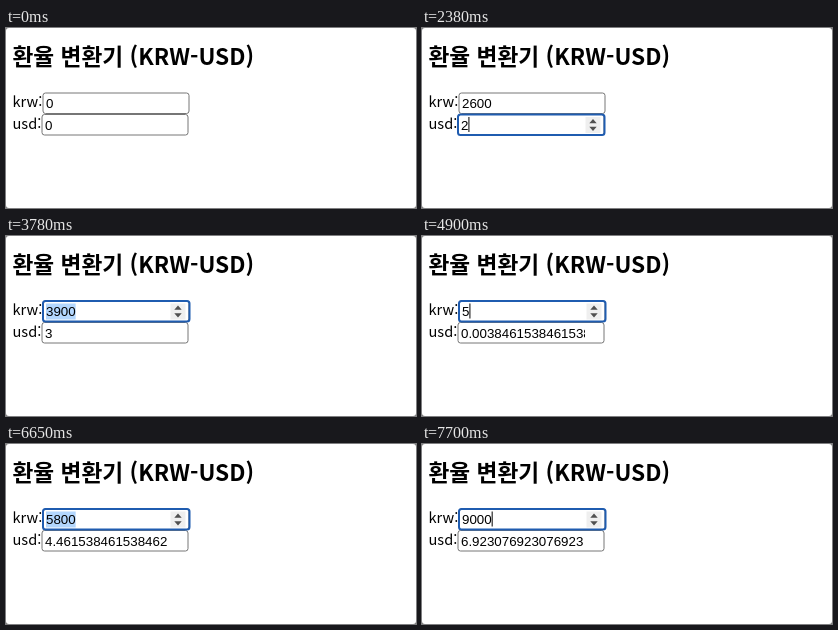
These frames come from a looping animation (410 by 180 pixels, 8 s). An HTML page:

```html
<!DOCTYPE html>
<html lang="ko">
<head>
<meta charset="utf-8">
<title>환율 변환기</title>
<style>
  html, body { margin: 0; width: 100%; height: 100%; overflow: hidden; background: #777; }
  svg { display: block; width: 410px; height: 180px; }
  .label { font-family: "Noto Sans CJK KR", "Noto Sans CJK", "Noto Sans", sans-serif; font-size: 14.6px; }
  .title { font-size: 22.7px; font-weight: 700; }
  .value { font-family: "Liberation Sans", Arial, sans-serif; font-size: 13.333px; }
</style>
</head>
<body>
<svg id="stage" viewBox="0 0 410 180">
  <rect width="410" height="180" rx="3" fill="#fff"/>
  <text class="label title" x="6.5" y="36.5">환율 변환기 (KRW-USD)</text>
  <text class="label" x="6.5" y="79">krw:</text>
  <text class="label" x="6.5" y="100.5">usd:</text>
</svg>
<script>
const LOOP = 8000, RATE = 1300, DIGIT = 7.415;
const stage = document.getElementById('stage');

function add(tag, attrs, parent = stage) {
  const el = document.createElementNS('http://www.w3.org/2000/svg', tag);
  for (const key in attrs) el.setAttribute(key, attrs[key]);
  parent.append(el);
  return el;
}

const show = (el, on) => el.setAttribute('visibility', on ? 'visible' : 'hidden');

function makeField(id, x, y) {
  const g = add('g', { transform: `translate(${x} ${y})` });
  const border = add('rect', { x: .5, y: .5, width: 146, height: 20.5, rx: 2.5, fill: '#fff' }, g);
  const mark = add('rect', { x: 3.5, y: 3, height: 16, fill: '#b3d7fe' }, g);
  const clip = add('clipPath', { id }, g);
  add('rect', { x: 3, y: 2, width: 124.5, height: 18 }, clip);
  const text = add('text', { class: 'value', x: 3.5, y: 15.5, 'clip-path': `url(#${id})` }, g);
  const caret = add('rect', { y: 3, width: 1, height: 15, fill: '#000' }, g);
  const spin = add('g', {}, g);
  add('rect', { x: 128, y: 3, width: 15, height: 16, fill: '#efefef' }, spin);
  add('path', { d: 'M131.8 9.3h7.4l-3.7-4.3zM131.8 12.7h7.4l-3.7 4.3z', fill: '#505050' }, spin);
  const ring = add('rect', { x: .5, y: .5, width: 146.5, height: 20.5, rx: 2.5,
    fill: 'none', stroke: '#1f5cb0', 'stroke-width': 2 }, g);

  return (value, focus, hover, cursor) => {
    const width = value.length * DIGIT;
    text.textContent = value;
    border.setAttribute('stroke', hover ? '#505050' : '#767676');
    mark.setAttribute('width', width);
    caret.setAttribute('x', 3.5 + width);
    show(mark, focus && cursor === 'all');
    show(caret, focus && cursor === 'on');
    show(spin, focus || hover);
    show(ring, focus);
    if (focus) stage.append(g);
  };
}

const draw = {
  krw: makeField('clipKrw', 36.5, 64.5),
  usd: makeField('clipUsd', 35.5, 86)
};

// time, focused field, typed value, cursor, hovered field
const steps = [
  [0, '', 0, 'off', ''],
  [490, 'krw', 0, 'on', 'krw'],
  [630, 'krw', 0, 'on', 'usd'],
  [770, 'usd', 0, 'on', 'usd'],
  [980, 'usd', 0, 'all', 'usd'],
  [1400, 'usd', 1, 'on', ''],
  [1890, 'usd', 1, 'off', ''],
  [2100, 'usd', 1, 'all', ''],
  [2380, 'usd', 2, 'on', ''],
  [2870, 'usd', 2, 'all', ''],
  [3220, 'usd', 3, 'on', ''],
  [3360, 'usd', 3, 'on', 'krw'],
  [3710, 'krw', 3900, 'on', 'krw'],
  [3780, 'krw', 3900, 'all', 'krw'],
  [4900, 'krw', 5, 'on', ''],
  [5390, 'krw', 58, 'on', ''],
  [5600, 'krw', 580, 'on', ''],
  [5810, 'krw', 5800, 'on', ''],
  [6370, 'krw', 5800, 'off', ''],
  [6580, 'krw', 5800, 'on', 'krw'],
  [6650, 'krw', 5800, 'all', 'krw'],
  [7070, 'krw', 9, 'on', ''],
  [7350, 'krw', 90, 'on', ''],
  [7560, 'krw', 900, 'on', ''],
  [7700, 'krw', 9000, 'on', '']
];

let current;
function frame() {
  const t = performance.now() % LOOP;
  const step = steps.findLast(s => s[0] <= t);
  if (step !== current) {
    current = step;
    const [, focus, typed, cursor, hover] = step;
    const values = focus === 'usd'
      ? { krw: typed * RATE, usd: typed }
      : { krw: typed, usd: typed / RATE };
    for (const id in draw) draw[id](String(values[id]), focus === id, hover === id, cursor);
  }
  requestAnimationFrame(frame);
}
frame();
</script>
</body>
</html>
```
